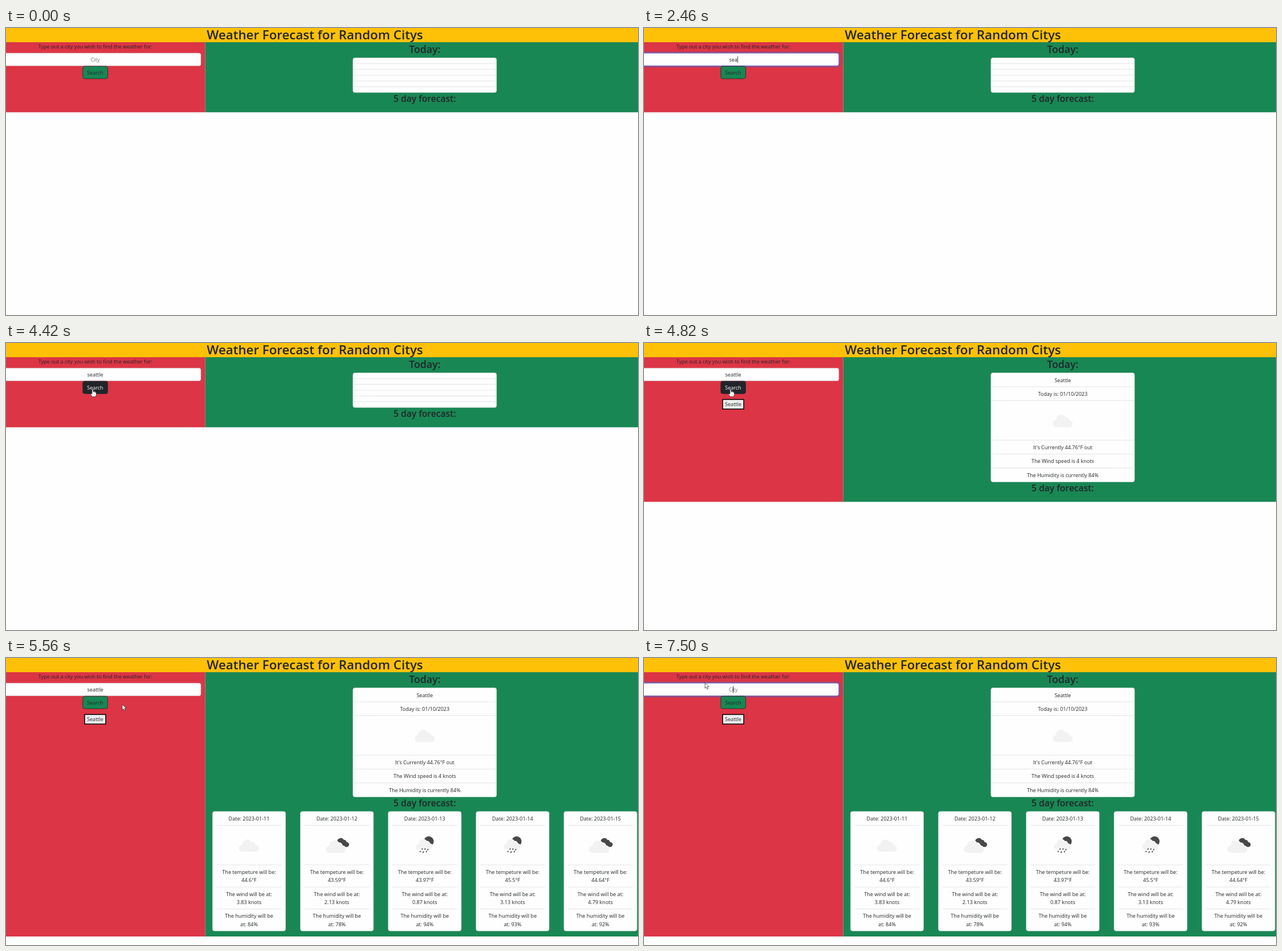
These frames come from a looping animation (1109 px wide and 505 px high, 8 s). An HTML page:

```html
<!DOCTYPE html>
<html lang="en">
<head>
<meta charset="utf-8">
<title>Weather Forecast</title>
<style>
  html, body { margin: 0; width: 100%; height: 100%; overflow: hidden; background: #fefefe; }
  svg { display: block; }
  text { font: 9.05px "Open Sans", "Noto Sans", sans-serif; fill: #212529; text-anchor: middle; white-space: pre; }
  .h { font-weight: 600; }
  .card { fill: #fefefe; stroke: #d5dcd8; stroke-width: .6; }
  .line { stroke: #dedede; stroke-width: .8; }
</style>
</head>
<body>
<svg id="stage" width="1109" height="505" viewBox="0 0 1109 505">
  <defs>
    <path id="cloud" d="M6.5 23a6.2 6.2 0 0 1-.3-12.4A8.7 8.7 0 0 1 22.5 5.8 5.3 5.3 0 0 1 29 11 6 6 0 0 1 29.5 23Z"/>
    <clipPath id="selClip"><rect id="selRect" y="49" width="0" height="13"/></clipPath>
  </defs>
  <rect id="red" y="25" width="349.6" fill="#dc3545"/>
  <rect id="green" x="349.6" y="25" width="760" fill="#198754"/>
  <rect width="1109" height="25" fill="#ffc107"/>
  <g id="page"></g>

  <rect id="halo" x="-20" y="41.6" width="364.6" height="27.8" rx="5.5" fill="#0d6efd" fill-opacity=".25"/>
  <rect x="-20" y="44.2" width="361.9" height="22.4" rx="3.4" fill="#fefefe" stroke="#ced4da" stroke-width=".6"/>
  <rect id="ring" x="-20" y="44" width="362" height="22.8" rx="3.6" fill="none" stroke="#5a58c0"/>
  <text id="value" x="156.6" y="59.2"></text>
  <g clip-path="url(#selClip)">
    <rect x="142" y="49" width="29.5" height="13" fill="#3367d1"/>
    <text x="156.6" y="59.2" style="fill:#fff">seattle</text>
  </g>
  <rect id="caret" y="49.5" width=".9" height="12" fill="#212529"/>

  <rect id="button" x="134.8" y="67.2" width="43.6" height="22" rx="3.4" stroke="#212529" stroke-width=".8"/>
  <text id="search" x="156.4" y="81.6">Search</text>

  <g id="arrow"><path d="M0 0V9.6L2.2 7.6 3.8 11.2 5.5 10.4 3.9 7H7Z" fill="#fff" stroke="#222" stroke-width=".7"/></g>
  <g id="beam"><path d="M-2.4-4.8H-.6L0-4.3.6-4.8H2.4M0-4.3V4.3M-2.4 4.8H-.6L0 4.3.6 4.8H2.4" fill="none" stroke="#222" stroke-width=".9"/></g>
  <g id="hand"><path d="M-1.1 .9Q0-.8 1.1 .9V4.8Q2-.1 3 5 4-.1 4.9 5.6 5.8 4.6 6.4 6.2V9.4L5.3 13H-.7L-3.7 8.6Q-3.9 6.8-1.1 8.3Z" fill="#fff" stroke="#222" stroke-width=".7"/></g>
</svg>
<script>
const $ = id => document.getElementById(id);
const set = (id, attrs) => { for (const k in attrs) $(id).setAttribute(k, attrs[k]); };
const show = (id, on) => { $(id).style.display = on ? "" : "none"; };
const clamp = v => Math.max(0, Math.min(1, v));

const text = (s, x, y) => `<text x="${x}" y="${y}">${s}</text>`;
const heading = (s, x, y, size) => `<text class="h" x="${x}" y="${y}" style="font-size:${size}px">${s}</text>`;
const card = (x, y, w, h) => `<rect class="card" x="${x}" y="${y}" width="${w}" height="${h}" rx="3.5"/>`;
const line = (x1, x2, y) => `<path class="line" d="M${x1} ${y}H${x2}"/>`;
const cloud = (x, y, scale = 1, style = 'fill="#f2f2f2"') =>
  `<use href="#cloud" transform="translate(${x} ${y}) scale(${scale})" ${style}/>`;

const DARK = 'fill="#484848"', EDGED = 'fill="#f2f2f2" stroke="#fefefe" stroke-width="2.4" paint-order="stroke"';
const icons = {
  cloud: x => cloud(x - 18, 318),
  broken: x => cloud(x - 4, 316, .72, DARK) + cloud(x - 19.8, 320, 1, EDGED),
  rain: x => `<circle cx="${x + 7}" cy="322.6" r="8.8" ${DARK}/>` + cloud(x - 15.5, 318, .82, EDGED) +
    `<path transform="translate(${x} 0)" d="M-4 335l-1 2.4M1 335l-1 2.4M6 336l-1 2.4M-7.5 339.5l-1 2M-2 340l-1.2 3M3.5 339.5l-1 2.5" stroke="#484848" stroke-width="1.7"/>`
};

const days = [
  ["cloud", "44.6", "3.83", 84],
  ["broken", "43.59", "2.13", 78],
  ["rain", "43.97", "0.87", 94],
  ["rain", "45.5", "3.13", 93],
  ["broken", "44.64", "4.79", 92]
];

function dayCard([icon, temp, wind, humidity], i) {
  const x = 362.4 + i * 154.15, mid = x + 64.1;
  const rows = [
    [`Date: 2023-01-${11 + i}`, 285.8],
    ["The tempeture will be:", 380], [`${temp}°F`, 394.3],
    ["The wind will be at:", 418.7], [`${wind} knots`, 433],
    ["The humidity will be", 457.4], [`at: ${humidity}%`, 471.6]
  ];
  return card(x, 270, 128.2, 210.3) + icons[icon](mid) +
    [294.5, 364, 403, 441.7].map(y => line(x + 7.2, x + 121, y)).join("") +
    rows.map(([s, y]) => text(s, mid, y)).join("");
}

$("page").innerHTML =
  heading("Weather Forecast for Random Citys", 542, 20, 22.3) +
  heading("Today:", 734.8, 44, 17.7) +
  `<g id="outlook">${heading("5 day forecast:", 734.8, 130.3, 15.6)}</g>` +
  text("Type out a city you wish to find the weather for:", 156.7, 35.8) +
  `<g id="empty">${card(608.8, 52.6, 252, 61)}${[0, 1, 2, 3, 4].map(i => line(609, 860.6, 62.6 + i * 10.2)).join("")}</g>` +
  `<g id="today">${card(608.8, 52.6, 252, 191.8)}${[77, 101.4, 171, 195.4, 219.8].map(y => line(609, 860.6, y)).join("")}` +
  [["Seattle", 68.5], ["Today is: 01/10/2023", 93], ["It's Currently 44.76°F out", 187],
   ["The Wind speed is 4 knots", 211.4], ["The Humidity is currently 84%", 235.8]]
    .map(([s, y]) => text(s, 734.8, y)).join("") + cloud(717, 125) +
  `<rect x="138" y="99.4" width="37" height="16.8" fill="#efefef" stroke="#000" stroke-width="1.5"/>${text("Seattle", 156.5, 111.2)}</g>` +
  `<g id="week">${days.map(dayCard).join("")}</g>`;

// time, x, y
const path = [
  [190, 1068, 498], [990, 253, 55.5], [3460, 250, 52], [3750, 190, 84], [3970, 137, 98], [4210, 152, 81.5],
  [4820, 152, 81.5], [5020, 157, 82], [5420, 196, 84], [5820, 224, 76], [6290, 215.5, 60], [6480, 215.5, 60], [6760, 107, 43.6]
];
function pointer(t) {
  const i = path.findIndex(p => p[0] > t);
  if (i < 0) return path.at(-1).slice(1);
  const [t0, x0, y0] = path[Math.max(0, i - 1)], [t1, x1, y1] = path[i];
  if (t0 === 990) return [x0, y0];
  const u = clamp((t - t0) / (t1 - t0)), k = u * u * (3 - 2 * u);
  return [x0 + (x1 - x0) * k, y0 + (y1 - y0) * k];
}

const keys = [2060, 2260, 2460, 2660, 2790, 2930, 3060];
const carets = [[1100, 1600], [2060, 3560], [4060, 4280], [7500, 8000]];

function draw(t) {
  const filled = t >= 4820, week = t >= 5020;
  const bottom = week ? 490 : filled ? 279.5 : 148.3;
  set("red", { height: bottom - 25 });
  set("green", { height: bottom - 25 });
  set("outlook", { transform: `translate(0 ${filled ? 131 : 0})` });
  show("empty", !filled);
  show("today", filled);
  show("week", week);

  const focus = t < 4280 ? clamp((t - 1060) / 130) : t < 6480 ? clamp((4420 - t) / 140) : clamp((t - 6480) / 140);
  set("halo", { opacity: focus });
  set("ring", { opacity: focus });

  const typed = t < 7500 ? "seattle".slice(0, keys.filter(k => t >= k).length) : "";
  const value = $("value");
  value.textContent = typed || "City";
  value.style.fill = typed ? "#212529" : "#6c757d";
  const caretX = 156.6 + (typed ? value.getComputedTextLength() / 2 : -.4);
  set("caret", { x: caretX });
  show("caret", carets.some(([a, b]) => t >= a && t < b));

  const [x, y] = pointer(t);
  const selecting = t >= 6480 && t < 7500;
  set("selRect", { x, width: selecting ? Math.max(0, 172 - x) : 0 });

  const hover = x > 134.5 && x < 178.5 && y > 67 && y < 89.5;
  set("button", { fill: hover ? "#212529" : "#198754" });
  $("search").style.fill = hover ? "#fff" : "#212529";

  const visible = t >= 190 && (t < 1400 || t >= 3460);
  const shape = hover ? "hand" : x < 342 && y > 44 && y < 67 ? "beam" : "arrow";
  for (const id of ["arrow", "beam", "hand"]) {
    show(id, visible && id === shape);
    set(id, { transform: `translate(${x} ${y})` });
  }
}

const start = performance.now();
function frame() {
  draw((performance.now() - start) % 8000);
  requestAnimationFrame(frame);
}
frame();
</script>
</body>
</html>
```
